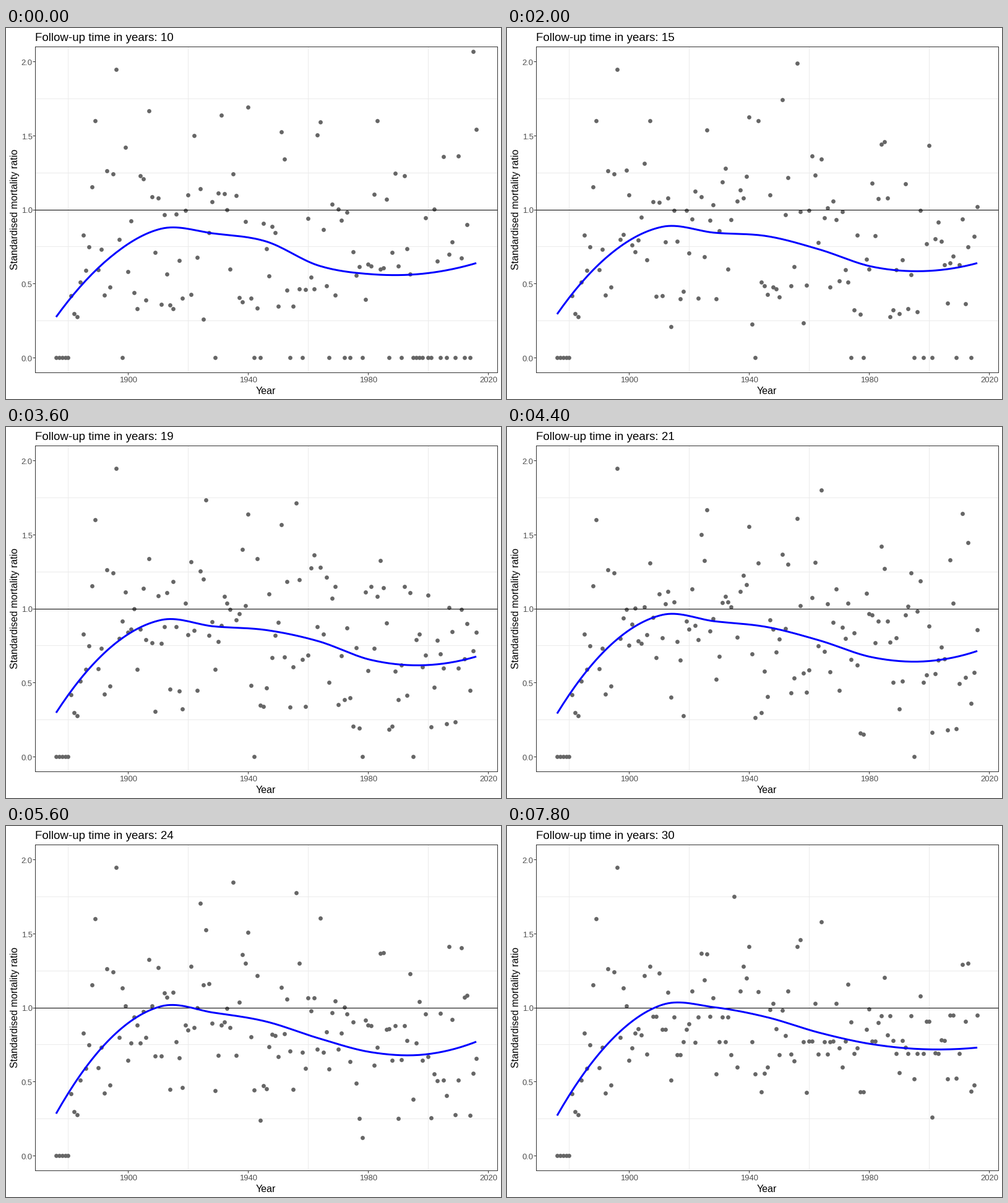
Animation of 800 by 600 pixels, one loop 8000 ms. Source, as a matplotlib script:

```python
import numpy as np
import matplotlib.pyplot as plt
from matplotlib.animation import FuncAnimation

W, H, DPI = 800, 600, 100
PX = 72 / DPI                     # points per pixel
LEFT, RIGHT, TOP, BOTTOM = 47, 794, 30, 557
FRAMES, INTERVAL = 40, 200

plt.rcParams["font.family"] = "Liberation Sans"

YEARS = np.arange(1876, 2017)

# Trend curve: key heights every 17.5 years, at four moments
MOMENTS = [0, 14, 28, 39]
TRENDS = np.array([
    [0.274, 0.668, 0.870, 0.838, 0.784, 0.621, 0.563, 0.567, 0.638],
    [0.301, 0.705, 0.888, 0.845, 0.834, 0.773, 0.634, 0.591, 0.638],
    [0.283, 0.778, 1.008, 0.965, 0.905, 0.792, 0.698, 0.682, 0.769],
    [0.270, 0.768, 1.018, 1.001, 0.934, 0.829, 0.752, 0.718, 0.729],
])

# The oldest cohorts are complete, so their ratios stay put
COMPLETE = [0, 0, 0, 0, 0, 0.418, 0.295, 0.274, 0.508, 0.825, 0.587,
            0.746, 1.151, 1.598, 0.591, 0.730, 0.420, 1.260, 0.475,
            1.242, 1.944, 0.796]


def trend_at(frame):
    """Smooth curve through the key heights, blended between moments."""
    y = np.array([np.interp(frame, MOMENTS, col) for col in TRENDS.T])
    m = np.gradient(y, edge_order=2)
    u = (YEARS - YEARS[0]) / 17.5
    k = np.minimum(u.astype(int), len(y) - 2)
    u = u - k
    return ((1 + 2 * u) * (1 - u) ** 2 * y[k] + u * (1 - u) ** 2 * m[k]
            + u ** 2 * (3 - 2 * u) * y[k + 1] + u ** 2 * (u - 1) * m[k + 1])


def simulate_ratios():
    """Observed over expected deaths per cohort, for follow-up of 10 to 30 years."""
    rng = np.random.default_rng(7)
    follow_up = np.arange(10, 31)[:, None]
    follow_up = np.clip(np.minimum(follow_up, YEARS - YEARS[0]), 10, None)
    growth = np.log(follow_up / 10) / np.log(3)
    first = np.interp(YEARS, [1898, 2016], [3.4, 1.1])
    first = first * rng.lognormal(0, 0.15, len(YEARS))
    expected = first ** (1 - growth) * 12 ** growth
    observed = np.vstack([
        rng.poisson(expected[0] * trend_at(0)),
        rng.poisson(np.diff(expected, axis=0) * trend_at(FRAMES - 1)),
    ]).cumsum(axis=0)
    ratios = observed / expected
    ratios[:, :len(COMPLETE)] = COMPLETE
    return ratios


RATIOS = simulate_ratios()

fig = plt.figure(figsize=(W / DPI, H / DPI), dpi=DPI, facecolor="white")
ax = fig.add_axes([LEFT / W, 1 - BOTTOM / H,
                   (RIGHT - LEFT) / W, (BOTTOM - TOP) / H])
ax.set(xlim=(1869, 2023), ylim=(-0.1, 2.1))
ax.set_xticks([1900, 1940, 1980, 2020], labels=[])
ax.set_yticks([0, 0.5, 1, 1.5, 2], labels=[])
ax.tick_params(length=3.6 * PX, width=PX, color="#333333")
for spine in ax.spines.values():
    spine.set(color="#333333", linewidth=PX)


def label(x, y, text, size, color="black", **kw):
    return fig.text(x / W, 1 - y / H, text, fontsize=size * PX, color=color,
                    va="baseline", **kw)


for year in (1880, 1920, 1960, 2000):
    ax.axvline(year, color="#ebebeb", lw=PX, zorder=0)
for ratio in (0.25, 0.75, 1.25, 1.75):
    ax.axhline(ratio, color="#ebebeb", lw=PX, zorder=0)

for year in (1900, 1940, 1980, 2020):
    x = LEFT + (year - 1869) * (RIGHT - LEFT) / 154
    label(x, 573.3, str(year), 13, "#4d4d4d", ha="center")
for ratio in (0, 0.5, 1, 1.5, 2):
    y = BOTTOM - (ratio + 0.1) * (BOTTOM - TOP) / 2.2
    label(42.6, y + 5.8, f"{ratio:.1f}", 13, "#4d4d4d", ha="right")

label(420, 592, "Year", 16, ha="center")
label(19, 293, "Standardised mortality ratio", 16, ha="center",
      rotation=90, rotation_mode="anchor")
title = label(LEFT, 21, "", 18.8)

dots, = ax.plot([], [], "o", ms=6.8 * PX, mew=0, color="#666666", zorder=2)
ax.axhline(1, color="black", lw=PX, zorder=2.5)
trend, = ax.plot([], [], color="#0000ff", lw=3 * PX, zorder=3,
                 solid_capstyle="butt")


def draw(frame):
    # two frames per follow-up year; odd frames lie halfway between years
    before, after = frame // 2, (frame + 1) // 2
    title.set_text(f"Follow-up time in years: {10 + after}")
    dots.set_data(YEARS, (RATIOS[before] + RATIOS[after]) / 2)
    trend.set_data(YEARS, trend_at(frame))
    return title, dots, trend


anim = FuncAnimation(fig, draw, frames=FRAMES, interval=INTERVAL,
                     init_func=lambda: draw(0), repeat=True, repeat_delay=0)
plt.show()
```
